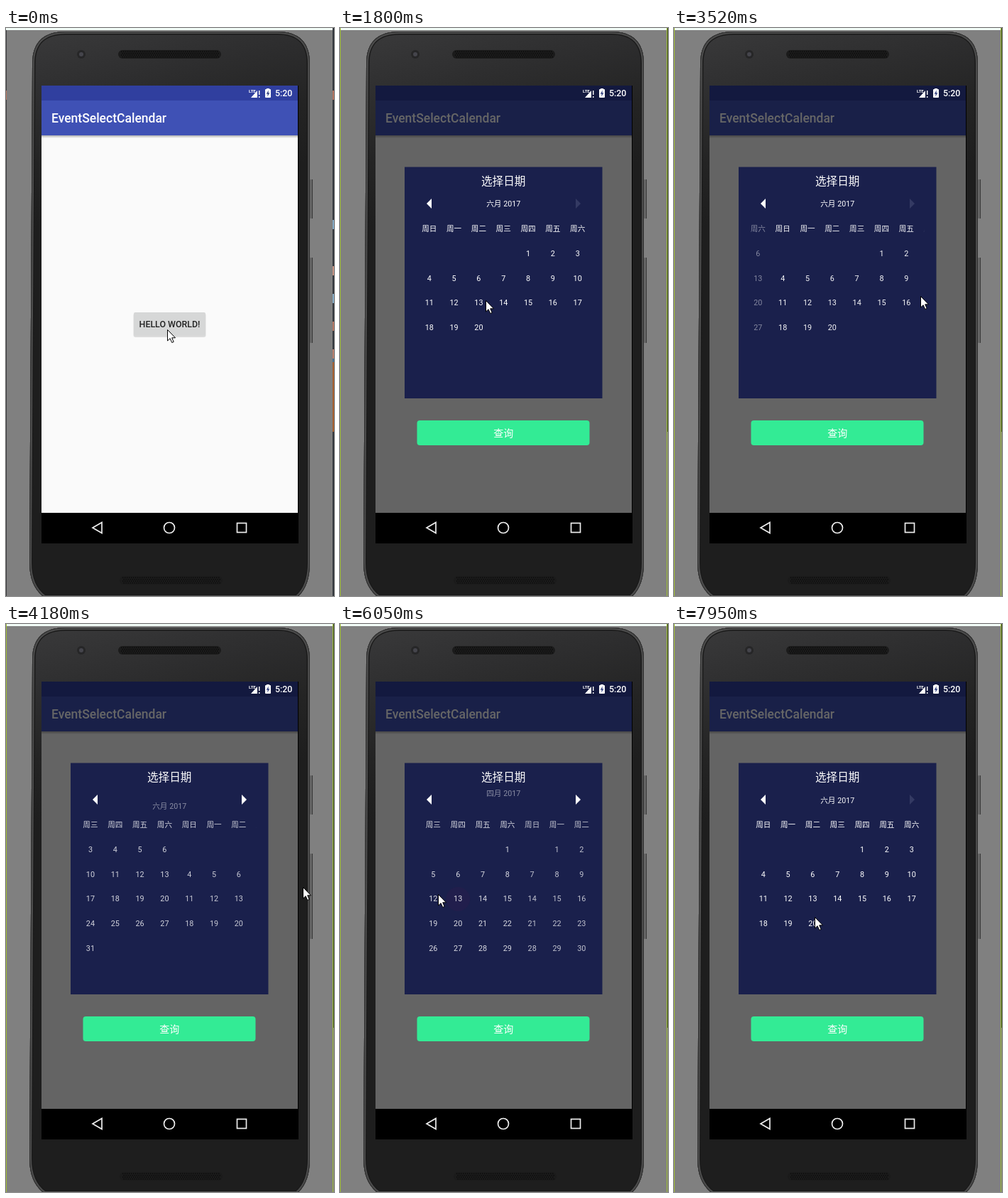
Animation of 462 by 799 pixels, one loop 8000 ms. Source, as an HTML page with a canvas:

```html
<!DOCTYPE html>
<html lang="zh">
<head>
<meta charset="utf-8">
<title>Calendar dialog</title>
<style>
html, body { margin: 0; width: 100%; height: 100%; overflow: hidden; background: #808080; }
canvas { display: block; width: 462px; height: 799px; }
</style>
</head>
<body>
<canvas id="stage" width="462" height="799"></canvas>
<script>
const ctx = document.getElementById('stage').getContext('2d');
const LOOP = 8000;
const FONT = 'Roboto, "Noto Sans CJK SC", "Noto Sans CJK", sans-serif';
const CELL = 34.82, PAGE = CELL * 7, CENTER = 230.2;
const WEEK = '日一二三四五六';

// Page 0 is the newest month; dragging right goes back in time.
const MONTHS = [
  { name: '六月 2017', first: 4, days: 20 },
  { name: '五月 2017', first: 1, days: 31 },
  { name: '四月 2017', first: 6, days: 30 }
];

const PACE = 133;
const ACTIVE = [[540, 810], [1520, 5650], [5900, 6690], [6960, 7950]];

// Mouse drags over the pager; the first and last entries only place the cursor.
const SWIPES = [
  { press: 0, release: 1260, from: [227, 424], to: [227, 424], page: 0 },
  { press: 1910, release: 2300, from: [205, 383], to: [335, 378], page: 0 },
  { press: 3110, release: 3390, from: [228, 395], to: [347, 377], page: 0 },
  { press: 3900, release: 4184, from: [270, 383], to: [418, 370], page: 1 },
  { press: 4960, release: 5300, from: [235, 386], to: [372, 378], page: 2 },
  { press: 5800, release: 6032, from: [253, 382], to: [138, 380], page: 1, ripple: 4 },
  { press: 6960, release: 7200, from: [255, 386], to: [140, 384], page: 0 },
  { press: 8080, release: 9000, from: [198, 412], to: [198, 412], page: 0 }
];
const REST = 130, SLOP = 16, SETTLE = 360;
const TITLE_LEAD = 150, TITLE_HALF = 500, TITLE_SHIFT = 17.6;

const clamp = v => Math.min(1, Math.max(0, v));
const progress = (t, start, end) => clamp((t - start) / (end - start));
const smooth = u => u * u * (3 - 2 * u);
const mix = (a, b, u) => a + (b - a) * u;
const mixPoint = (a, b, u) => a.map((v, i) => mix(v, b[i], u));

function recordedTime(t) {
  const span = ACTIVE.filter(a => a[0] <= t).pop();
  if (!span) return 0;
  const [start, end] = span;
  const steps = Math.round((end - start) / PACE);
  const step = (end - start) / steps;
  return start + step * Math.min(steps, Math.floor((t - start) / step + 0.12));
}

function cursorAt(t) {
  const i = SWIPES.findLastIndex(s => s.press <= t);
  const swipe = SWIPES[i], next = SWIPES[i + 1];
  if (t <= swipe.release) return mixPoint(swipe.from, swipe.to, progress(t, swipe.press, swipe.release));
  return mixPoint(swipe.to, next.from, smooth(progress(t, swipe.release + REST, next.press - REST)));
}

function scrollAt(t) {
  const i = SWIPES.findLastIndex(s => s.press <= t);
  if (i < 1) return 0;
  const { press, release, from, to, page } = SWIPES[i];
  const distance = (to[0] - from[0]) * progress(t, press, release);
  const dragged = Math.sign(distance) * Math.max(0, Math.abs(distance) - SLOP) / PAGE;
  const settled = 1 - (1 - progress(t, release, release + SETTLE)) ** 3;
  return mix(SWIPES[i - 1].page + dragged, page, settled);
}

// Title and arrows switch shortly before the drag ends.
function titleAt(t) {
  const i = SWIPES.findLastIndex((s, n) =>
    n && s.page !== SWIPES[n - 1].page && s.release - TITLE_LEAD <= t);
  if (i < 0) return { month: 0, target: 0, shift: 0, alpha: 1 };
  const from = SWIPES[i - 1].page, target = SWIPES[i].page;
  const phase = (t - SWIPES[i].release + TITLE_LEAD) / TITLE_HALF;
  const travel = TITLE_SHIFT * Math.sign(target - from);
  const left = (1 - clamp(phase < 1 ? phase : phase - 1)) ** 2;
  return phase < 1
    ? { month: from, target, shift: travel * (1 - left), alpha: left }
    : { month: target, target, shift: -travel * left, alpha: 1 - left };
}

function rect(x, y, w, h, fill, r = 0) {
  ctx.fillStyle = fill;
  ctx.beginPath();
  ctx.roundRect(x, y, w, h, r);
  ctx.fill();
}

function circle(x, y, r, fill) {
  rect(x - r, y - r, 2 * r, 2 * r, fill, r);
}

function poly(points, fill, stroke, width = 1) {
  ctx.beginPath();
  points.forEach(([x, y]) => ctx.lineTo(x, y));
  ctx.closePath();
  if (fill) { ctx.fillStyle = fill; ctx.fill(); }
  if (stroke) { ctx.strokeStyle = stroke; ctx.lineWidth = width; ctx.stroke(); }
}

function text(str, x, y, size, color = '#fff', align = 'center', weight = 400) {
  ctx.font = `${weight} ${size}px ${FONT}`;
  ctx.textAlign = align;
  ctx.fillStyle = color;
  ctx.fillText(str, x, y);
}

function gradient(x0, y0, x1, y1, ...colors) {
  const g = ctx.createLinearGradient(x0, y0, x1, y1);
  colors.forEach((color, i) => g.addColorStop(i / (colors.length - 1), color));
  return g;
}

function drawEdges(t) {
  rect(0, 0, 462, 799, '#808080');
  rect(0, 0, 462, 3, '#f1fbf6');
  if (t >= 140) {
    rect(0, 0, 1, 799, '#9dbb35');
    rect(460, 0, 1, 799, '#9dbb35');
    rect(461, 0, 1, 568, '#3a4a22');
    return;
  }
  rect(0, 3, 1, 796, '#3a3a3c');
  rect(460, 0, 2, 799, '#30343a');
  let seed = 7;
  for (let y = 75; y < 470; y += 13) {
    seed = seed * 137 % 1009;
    if (seed % 3) continue;
    const color = `hsl(${seed % 2 ? 15 : 205} 35% ${40 + seed % 25}%)`;
    rect(460, y, 2, 13, color);
    if (y < 155) rect(0, y, 1, 13, color);
  }
  rect(460, 470, 2, 98, '#a35c2c');
}

function speaker(x, y) {
  rect(x, y, 145, 12, '#1b1b1b', 6);
  for (let row = 0; row < 4; row++)
    for (let i = 0; i < 46; i++)
      rect(x + 4 + i * 3 + row % 2 * 1.5, y + 1.5 + row * 2.5, 1.3, 1.3, '#090909');
}

function drawPhone() {
  for (const [y, h] of [[213, 55], [323, 120]]) {
    rect(428, y, 4, h, '#666', 1);
    rect(431, y, 1, h, '#3a3a3a');
  }
  const body = new Path2D('M37 50Q37 5 84 5H382Q428 5 428 50V752Q428 786 410 801H54Q33 786 33 752Z');
  ctx.save();
  ctx.clip(body);
  rect(0, 0, 462, 799, gradient(60, 5, 120, 260, '#39393a', '#2e2e2f', '#242424', '#1e1e1e'));
  for (const [width, color] of [[9, '#1a1a1a'], [6, '#4c4c4c'], [2, '#303030']]) {
    ctx.strokeStyle = color;
    ctx.lineWidth = width;
    ctx.stroke(body);
  }
  ctx.restore();
  circle(106, 37, 6, '#262627');
  circle(106, 37, 3, '#45454c');
  speaker(158, 31);
  speaker(160, 771);
}

function drawStatusIcons() {
  text('LTE', 342, 91, 6, '#fff', 'left', 700);
  poly([[345, 98], [354, 98], [354, 88]], '#fff');
  rect(356, 88, 1.4, 6, '#fff');
  rect(356, 96, 1.4, 2, '#fff');
  rect(367, 85, 4, 2, '#fff');
  rect(365, 86, 8, 12, '#fff', 1);
  poly([[369.8, 87.5], [366.7, 92.8], [368.7, 92.8], [368.2, 96.5], [371.4, 91.2], [369.4, 91.2]], '#303f7f');
  text('5:20', 379, 96, 12.4, '#fff', 'left', 500);
}

function drawApp(dim) {
  rect(50, 81, 362, 644, '#000');
  rect(50, 81, 361, 601, '#fafafa');
  rect(50, 151, 361, 4, gradient(0, 151, 0, 155, 'rgba(0,0,0,.3)', 'rgba(0,0,0,0)'));
  rect(50, 81, 361, 21, '#303f9f');
  rect(50, 102, 361, 49, '#3f51b5');
  text('EventSelectCalendar', 64, 133, 17.5, '#fff', 'left', 500);
  rect(179.5, 401, 102, 34, 'rgba(0,0,0,.12)', 3);
  rect(180, 400, 101, 33, '#d6d7d7', 2);
  text('HELLO WORLD!', 230.5, 421, 12.4, '#222', 'center', 500);
  rect(50, 81, 361, 601, `rgba(0,0,0,${dim})`);
  drawStatusIcons();

  poly([[122, 703], [135, 695.5], [135, 710.5]], null, '#eee', 1.7);
  ctx.beginPath();
  ctx.arc(230, 703, 7.5, 0, 7);
  ctx.stroke();
  ctx.strokeRect(325.5, 696.5, 13, 13);
}

function drawMonth(index, t) {
  const position = scrollAt(t) - index;
  if (Math.abs(position) >= 1) return;
  const { first, days } = MONTHS[index];
  const columnX = col => CENTER + position * PAGE + (col - 3) * CELL;
  ctx.save();
  ctx.globalAlpha *= (1 - Math.abs(position)) ** 0.35;
  const swipe = SWIPES.findLast(s => s.press <= t);
  if (swipe.ripple && index === swipe.page + 1 && t <= swipe.release)
    circle(columnX(swipe.ripple), 387, 17, 'rgba(75,22,75,.18)');
  for (let col = 0; col < 7; col++) text('周' + WEEK[col], columnX(col), 286, 10.6);
  for (let day = 1; day <= days; day++) {
    const cell = first + day - 1;
    text(day, columnX(cell % 7), 320.8 + Math.floor(cell / 7) * CELL, 10.8);
  }
  ctx.restore();
}

function drawDialog(t, opening) {
  const { month, target, shift, alpha } = titleAt(t);
  ctx.save();
  ctx.globalAlpha = 1 - (1 - opening) ** 2.4;
  rect(91, 195.5, 278.5, 325.5, '#1a204c');
  text('选择日期', CENTER, 221, 15.6);
  poly([[122, 247], [129, 240], [129, 254]], '#fff');
  poly([[339, 247], [332, 240], [332, 254]], target ? '#fff' : '#343a63');
  rect(108.5, 552, 243, 35, '#33eb95', 4);
  text('查询', CENTER, 575, 14);
  ctx.save();
  ctx.globalAlpha *= alpha;
  text(MONTHS[month].name, CENTER, 251 + shift, 10.7);
  ctx.restore();
  ctx.beginPath();
  ctx.rect(CENTER - PAGE / 2, 265, PAGE, 256);
  ctx.clip();
  MONTHS.forEach((_, i) => drawMonth(i, t));
  ctx.restore();
}

function drawCursor(t) {
  const [x, y] = cursorAt(t);
  ctx.save();
  ctx.translate(Math.round(x) + 0.5, Math.round(y) + 0.5);
  poly([[0, 0], [0, 15.5], [3.6, 12.2], [6.2, 18], [8.7, 17], [6.2, 11.3], [11, 11.3]], '#fff', '#000');
  ctx.restore();
}

function frame(now) {
  const clock = now % LOOP;
  const t = recordedTime(clock);
  const opening = progress(t, 420, 810);
  drawEdges(clock);
  drawPhone();
  drawApp(0.6 * opening ** 2);
  drawDialog(t, opening);
  drawCursor(t);
  requestAnimationFrame(frame);
}
requestAnimationFrame(frame);
</script>
</body>
</html>
```
